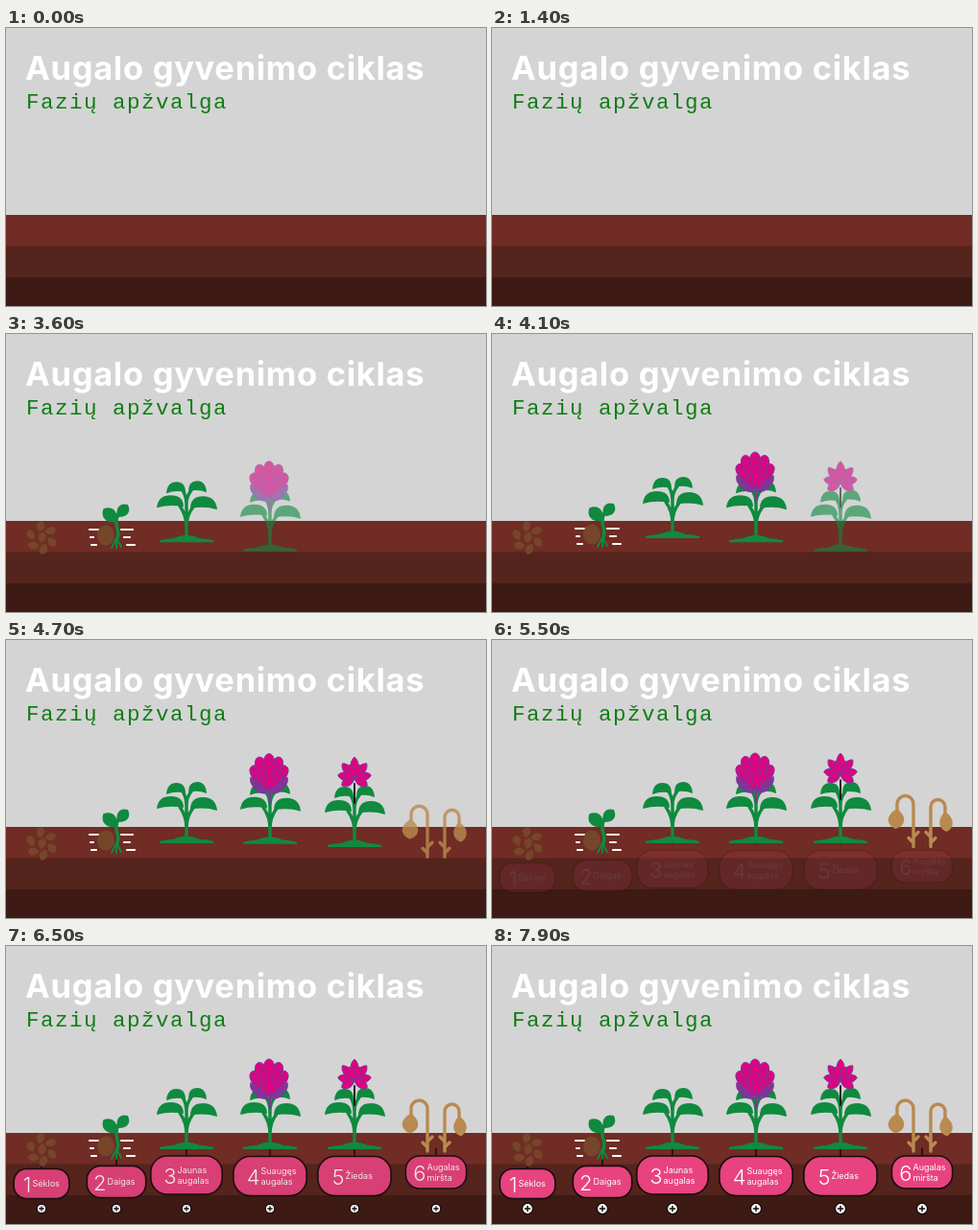
An HTML page that plays this animation: 500x290 px, repeating every 8000 ms.

```html
<!DOCTYPE html>
<html lang="lt">
<head>
<meta charset="utf-8">
<style>
html, body { margin: 0; width: 100%; height: 100%; overflow: hidden; background: #d4d4d4; }
svg { display: block; width: 500px; height: 290px; }
text { font-family: Inter, sans-serif; fill: #fff; }
.title { font-size: 34.5px; font-weight: 700; letter-spacing: .7px; }
.sub { font: 22.5px "Liberation Mono", monospace; letter-spacing: 1.5px; fill: #0f7d14; }
.num { font-size: 22px; font-weight: 300; text-anchor: end; }
.name { font-size: 9px; }
.line { fill: none; stroke-linecap: round; stroke-linejoin: round; }
</style>
</head>
<body>
<svg viewBox="0 0 500 290">
  <rect width="500" height="290" fill="#d4d4d4"/>
  <rect y="195" width="500" height="95" fill="#702c25"/>
  <rect y="227.5" width="500" height="63" fill="#54241d"/>
  <rect y="260" width="500" height="30" fill="#3d1a14"/>
  <text class="title" x="20" y="54">Augalo gyvenimo ciklas</text>
  <text class="sub" x="21" y="84">Fazių apžvalga</text>
  <g id="labels"></g>
  <g id="stages"></g>
  <g id="buttons"></g>
</svg>
<script>
const GREEN = '#0f8a3f', PINK = '#e2007f', PURPLE = '#7d3698', BROWN = '#75462a', TAN = '#b98a50', BLACK = '#160b0c';
const $ = id => document.getElementById(id);
const range = (n, f) => Array.from({ length: n }, (_, i) => f(i)).join('');
const at = (x, y, content) => `<g transform="translate(${x} ${y})">${content}</g>`;
const path = (d, fill, extra = '') => `<path d="${d}" fill="${fill}" ${extra}/>`;
const line = (d, color, width) => `<path class="line" d="${d}" stroke="${color}" stroke-width="${width}"/>`;

// A leaf shape growing from its base; a larger tip value rounds the end.
const blade = (x, y, turn, len, w, fill, tip = .8, stroke = 'none') => path(
  `M0 0C${-w} ${-len * .35} ${-w} ${-len * tip} 0 ${-len}C${w} ${-len * tip} ${w} ${-len * .35} 0 0`,
  fill, `stroke="${stroke}" stroke-width=".9" transform="translate(${x} ${y}) rotate(${turn})"`);

// A drooping leaf, arched away from the stem towards the given side.
const droop = (x, y, side, w, h) => path(
  `M0 ${h}Q0 0 ${w * .48} 0Q${w * .95} 0 ${w} ${h + 1}Q${w * .5} ${h * .75} 0 ${h}`,
  GREEN, `transform="translate(${x} ${y}) scale(${side} 1)"`);

// All drawings are centred on x = 0.
function seeds() {
  return blade(-1, 218, 15, 12, 5.5, BROWN) + range(6, i => {
    const a = (58 * i - 95) * Math.PI / 180;
    return at(11.5 * Math.cos(a), 212.5 + 12 * Math.sin(a), blade(0, 6, 0, 12, 5.5, BROWN)
      .replace('translate(0 6) rotate(0)', `rotate(${i * 65 + 10}) translate(0 6)`));
  });
}

function sprout() {
  const dashes = [10, 4, 6].map((len, i) =>
    line(`M${i - 28} ${203 + 8 * i}h${len - 1}M${5 + 3 * i} ${203 + 8 * i}h${len + 2}`, '#fff', 2.2)).join('');
  return dashes + `<ellipse cx="-11" cy="209" rx="9" ry="10.5" fill="${BROWN}"/>` +
    blade(1, 195, -47, 20, 9, GREEN) + blade(1, 190, 40, 17, 8, GREEN) +
    line('M1 188Q-1 196 1 202Q3 208 0 215', GREEN, 3.6) +
    line('M0 212l-5 10M0 212v10M0 212l5 9', GREEN, 1.8);
}

function plant() {
  return path('M-28 212V210Q-20 208 -14 208Q0 201 14 208Q20 208 28 210V212Z', GREEN) +
    line('M0 207V166M0 196Q0 184 -7 174M0 196Q0 184 7 175M0 174Q0 164 -4 158M0 172Q0 164 5 158', GREEN, 3.4) +
    droop(-3, 163, -1, 28, 12) + droop(4, 164, 1, 28, 13) +
    droop(-1, 149, -1, 20, 11) + droop(2, 148, 1, 19, 11);
}

function peony() {
  const wing = 'M-20 142Q-9 146 0 160Q-18 161 -20 142Z';
  // Petal tips of each layer lie on a circle through the base.
  const layer = size => [-3, 3, -2, 2, -1, 1, 0].map(i => {
    const turn = i * 18;
    return blade(0, 156, turn, size * Math.cos(turn * Math.PI / 180), size / 4.5, PINK, 1, PURPLE);
  }).join('');
  return plant() + line('M0 156V168', PURPLE, 2.5) +
    at(-1, 0, [38, 32, 25, 18].map(layer).join('') + path(wing, PURPLE) + path(wing, PURPLE, 'transform="scale(-1 1)"'));
}

function blossom() {
  const star = (n, step, len, w) => range(n, i => {
    const turn = (i - (n - 1) / 2) * step;
    return blade(0, 140, turn, len - Math.abs(turn) / 18, w, PINK, .8, PURPLE);
  });
  return plant() + line('M0 146V166', BLACK, 1.8) + star(7, 40, 22, 5.5) + star(6, 40, 16, 4);
}

function withered() {
  const stalk = (side, w, top, pod) => `<g transform="scale(${side} 1)">` +
    line(`M9 214V${top + w / 2}a${w / 2} ${w / 2} 0 0 1 ${w} 0v6M9 204l-5 -5M9 210l5 -5`, TAN, 3.4) +
    blade(9 + w, top + w / 2 + 5, 175, 21, pod, TAN) + '</g>';
  return stalk(-1, 17, 161, 11) + stalk(1, 15, 165, 9);
}

// x is shared by drawing, label and button; y and h place the label.
const stages = [
  { x: 37, y: 248, h: 31, draw: seeds, names: ['Sėklos'] },
  { x: 115, y: 246, h: 33, draw: sprout, names: ['Daigas'] },
  { x: 188, y: 239, h: 40, draw: plant, names: ['Jaunas', 'augalas'] },
  { x: 275, y: 240, h: 41, draw: peony, names: ['Suaugęs', 'augalas'] },
  { x: 363, y: 240, h: 41, draw: blossom, names: ['Žiedas'] },
  { x: 448, y: 236, h: 34, draw: withered, names: ['Augalas', 'miršta'] }
];

function label({ x, y, h, names }, i) {
  const w = h * 1.86;
  return at(x, y, line(`M0 ${-h / 2}v-8`, BLACK, 1.5) +
    `<rect x="${-w / 2}" y="${-h / 2}" width="${w}" height="${h}" rx="${h * .43}"
      fill="#e8437f" stroke="${BLACK}" stroke-width="1.6"/>
    <text class="num" x="-10.5" y="8.5">${i + 1}</text>` +
    names.map((name, k) => `<text class="name" x="-9.5" y="${8.5 - 5.5 * names.length + 11 * k}">${name}</text>`).join(''));
}

const button = ({ x }) => at(x, 274, `<g class="button"><circle r="5.6" fill="#fff" stroke="${BLACK}" stroke-width="1.4"/>
  ${line('M-2.6 0H2.6M0 -2.6V2.6', BLACK, 1.5)}</g>`);

$('stages').innerHTML = stages.map(s => `<g>${at(s.x, 0, s.draw())}</g>`).join('');
$('labels').innerHTML = stages.map(label).join('');
$('buttons').innerHTML = stages.map(button).join('');

const clamp = v => Math.max(0, Math.min(1, v));
const groups = [...$('stages').children], buttons = document.querySelectorAll('.button');

function draw(t) {
  groups.forEach((g, i) => {
    const age = t - 1800 - i * 500;
    g.setAttribute('opacity', clamp(age / 500));
    g.setAttribute('transform', `translate(0 ${24 * (1 - clamp(age / 2000)) ** 3})`);
  });
  $('labels').setAttribute('opacity', clamp((t - 5360) / 1270));
  $('buttons').setAttribute('opacity', clamp((t - 6000) / 400));
  const scale = .92 - .08 * Math.cos((t - 6500) / 1400 * Math.PI);
  buttons.forEach(b => b.setAttribute('transform', `scale(${scale})`));
}

const start = performance.now();
function tick() {
  draw((performance.now() - start) % 8000);
  requestAnimationFrame(tick);
}
tick();
</script>
</body>
</html>
```
